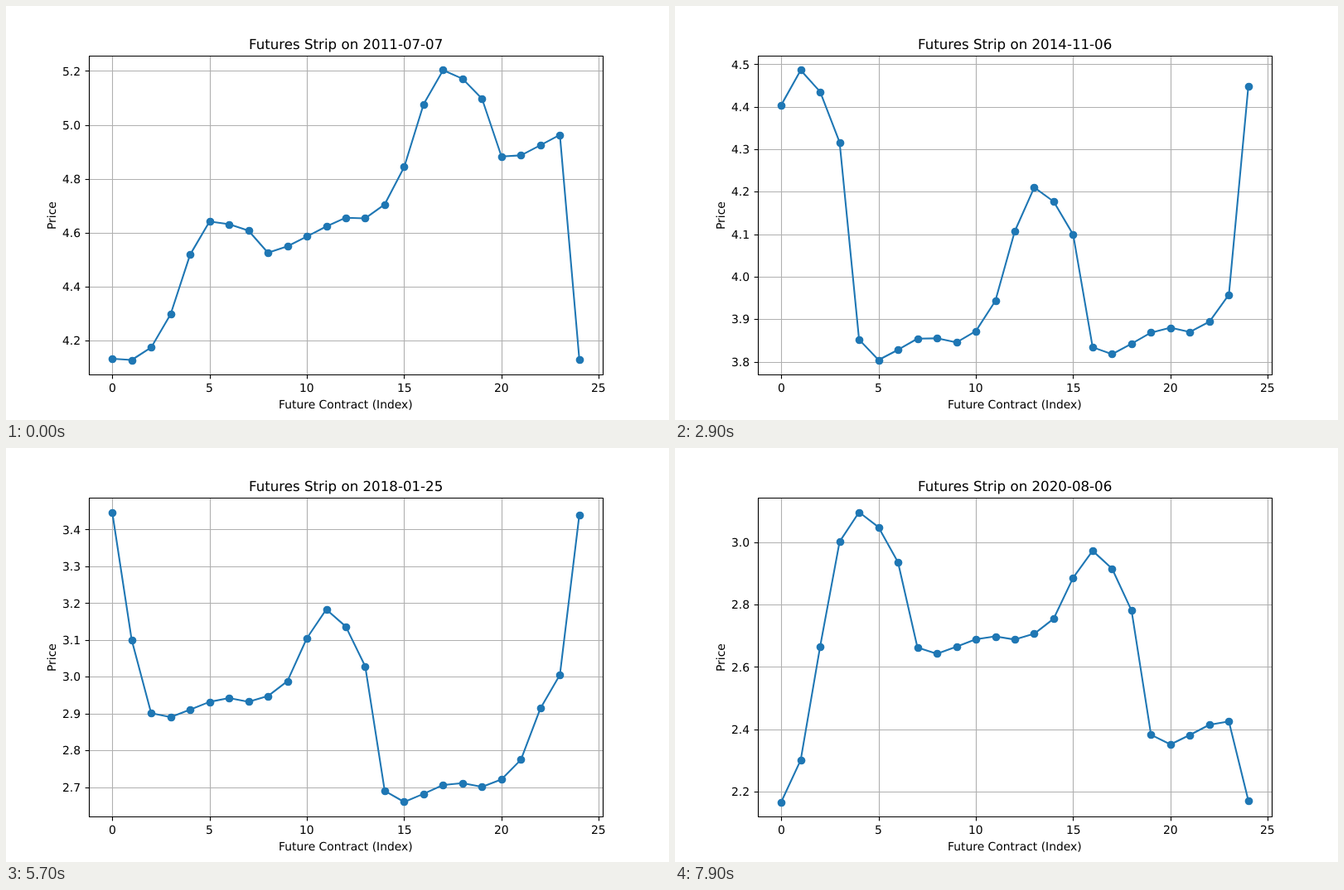
Animation of 800x500 px, one loop 8000 ms. Source, as an HTML page with a canvas:

```html
<!DOCTYPE html>
<html lang="en">
<head>
<meta charset="utf-8">
<title>Futures Strip</title>
<style>
  html, body { margin: 0; width: 100%; height: 100%; overflow: hidden; background: #fff; }
  canvas { display: block; width: 800px; height: 500px; }
</style>
</head>
<body>
<canvas id="chart" width="800" height="500"></canvas>
<script>
const ctx = document.getElementById("chart").getContext("2d");
const LOOP = 8000, STEP = 100, DAY = 864e5;
const FIRST_DATE = Date.UTC(2011, 6, 7);
const BOX = { left: 100, right: 720, top: 60, bottom: 445 };
const LAST = 24;
const BLUE = "#1f77b4", GRID = "#b0b0b0";
const PT = 100 / 72, THIN = 0.8 * PT, TICK = 3.5 * PT;
const FAMILY = '"DejaVu Sans", Verdana, sans-serif';

const dateAt = n => new Date(FIRST_DATE + n * 42 * DAY);
const lerp = (a, b, u) => a + (b - a) * u;
const snap = v => Math.floor(v + 0.5) + 0.5;

// Delivery month of the nearest contract: it expires two trading days before month end.
function frontMonth(n) {
  const date = dateAt(n), year = date.getUTCFullYear(), month = date.getUTCMonth();
  const end = new Date(Date.UTC(year, month + 1, 0));
  for (let left = 2; ;) {
    const weekday = end.getUTCDay();
    if (weekday % 6 && left-- === 0) break;
    end.setUTCDate(end.getUTCDate() - 1);
  }
  return year * 12 + month + (date > end ? 2 : 1);
}

// A year turns in January, March, April and August.
const TURNS = [0, 2, 3, 7];
const turnIndex = month =>
  Math.floor(month / 12) * 4 + TURNS.filter(t => t <= month % 12).length - 1;
const turnMonth = k => Math.floor(k / 4) * 12 + TURNS[k % 4];

// Autumn rise per month: a steeper year climbs earlier.
const RISE = [0, -0.07, -0.03, 0.07, 0.6], GAIN = [0, 0.12, 0.22, 0.5, 0.31];
const DIP = [0, 0.105, 0.055, 0];

// Prices at the turns, starting with the turn at or before the front month.
function strip(step, last, ...turns) {
  return { step, last, turns, month: frontMonth(step) };
}

const strips = [
  strip(0, 4.13, 4.133, 4.642, 4.608, 4.526, 4.656, 5.203, 5.097, 4.883, 4.99),
  strip(15, 4.01, 3.99, 4.13, 4.422, 4.336, 4.081, 4.156, 4.538, 4.443, 4.131),
  strip(29, 4.448, 4.23, 4.486, 4.316, 3.852, 3.855, 4.21, 4.099, 3.834, 3.88, 4.21),
  strip(46, 3.154, 2.72, 3.57, 3.538, 3.311, 3.328, 3.593, 3.465, 2.962, 2.941, 3.34),
  strip(57, 3.44, 3.596, 3.1, 2.901, 2.942, 3.183, 3.028, 2.69, 2.711, 3.005),
  strip(65, 3.68, 3.642, 3.354, 2.885, 2.9, 3.186, 2.921, 2.541, 2.57, 2.89),
  strip(79, 2.171, 2.12, 3.097, 2.936, 2.662, 2.698, 2.973, 2.781, 2.382, 2.425)
];

// Price of the same season in a known strip.
function seasonal({ month: front, turns }, month) {
  while (month < front) month += 12;
  while (month >= front + LAST) month -= 12;
  const k = turnIndex(month), j = k - turnIndex(front), s = month - turnMonth(k);
  const a = turns[j], b = turns[j + 1] ?? a, before = turns[j - 1] ?? a;
  switch (k % 4) {
    case 0: return lerp(a, b, s * 0.3);
    case 2: return lerp(a, b, s / 4) - DIP[s] * (before - a);
    case 3: return lerp(a, b, RISE[s] + GAIN[s] * (b - a));
    default: return a;
  }
}

const frontOf = s => seasonal(s, s.month);

// Turning points of the nearest price: step, price.
const fronts = [
  [7, 2.05], [18, 3.4], [24, 4.66], [31, 2.7], [41, 1.8], [58, 2.75], [64, 4], [66, 2.55], [78, 1.5],
  ...strips.map(s => [s.step, frontOf(s)])
].sort((a, b) => a[0] - b[0]);

function frontPrice(n) {
  const k = Math.max(1, fronts.findIndex(p => p[0] >= n));
  const [a, b] = [fronts[k - 1], fronts[k]];
  return lerp(a[1], b[1], (n - a[0]) / (b[0] - a[0]));
}

function pricesAt(n) {
  const k = Math.max(1, strips.findIndex(s => s.step >= n));
  const a = strips[k - 1], b = strips[k];
  const u = (n - a.step) / (b.step - a.step);
  const month = frontMonth(n);
  const values = Array.from({ length: LAST }, (_, i) =>
    lerp(seasonal(a, month + i), seasonal(b, month + i), u));
  // Near contracts follow the front price more than far ones.
  const shift = frontPrice(n) - values[0];
  const far = shift < 0 ? 0.4 : 0.1;
  const out = values.map((v, i) => v + shift * (far + (1 - far) * Math.exp(-i / 8)));
  out.push(out[0] + lerp(a.last - frontOf(a), b.last - frontOf(b), u));
  return out;
}

function tickStep(range) {
  const raw = range / 9, power = 10 ** Math.floor(Math.log10(raw));
  return power * [1, 2, 2.5, 5, 10].find(s => s * power >= raw - 1e-9);
}

function line(x1, y1, x2, y2, color) {
  ctx.strokeStyle = color;
  ctx.lineWidth = THIN;
  ctx.beginPath();
  ctx.moveTo(x1, y1);
  ctx.lineTo(x2, y2);
  ctx.stroke();
}

function text(str, x, y, align = 0.5, size = 10) {
  ctx.font = size * PT + "px " + FAMILY;
  ctx.textRendering = "geometricPrecision";
  ctx.fillStyle = "#000";
  ctx.fillText(str, Math.round(x - ctx.measureText(str).width * align), y);
}

function draw(n) {
  const prices = pricesAt(n);
  const min = Math.min(...prices), max = Math.max(...prices);
  const pad = (max - min) * 0.05, low = min - pad, high = max + pad;
  const { left, right, top, bottom } = BOX;
  const toX = i => left + (i + LAST * 0.05) / (LAST * 1.1) * (right - left);
  const toY = v => bottom - (v - low) / (high - low) * (bottom - top);

  ctx.fillStyle = "#fff";
  ctx.fillRect(0, 0, 800, 500);

  const step = tickStep(high - low);
  let digits = 0;
  while (digits < 3 && Math.abs(step * 10 ** digits - Math.round(step * 10 ** digits)) > 1e-6) digits++;
  const yTicks = [];
  for (let k = Math.ceil(low / step); k * step <= high; k++) yTicks.push(k * step);
  const xTicks = [0, 5, 10, 15, 20, 25];

  for (const i of xTicks) line(snap(toX(i)), top, snap(toX(i)), bottom, GRID);
  for (const v of yTicks) line(left, snap(toY(v)), right, snap(toY(v)), GRID);

  for (const i of xTicks) {
    const x = snap(toX(i));
    line(x, bottom + 0.5, x, bottom + 0.5 + TICK, "#000");
    text(String(i), toX(i), 466);
  }
  for (const v of yTicks) {
    const y = snap(toY(v));
    line(left + 0.5, y, left + 0.5 - TICK, y, "#000");
    text(v.toFixed(digits), left - 2 * TICK, Math.round(toY(v) + 5.2), 1);
  }

  ctx.strokeStyle = ctx.fillStyle = BLUE;
  ctx.lineWidth = 1.5 * PT;
  ctx.lineJoin = "round";
  ctx.beginPath();
  prices.forEach((v, i) => ctx.lineTo(toX(i), toY(v)));
  ctx.stroke();
  prices.forEach((v, i) => {
    ctx.beginPath();
    ctx.arc(snap(toX(i)), snap(toY(v)), 3.5 * PT, 0, 2 * Math.PI);
    ctx.fill();
  });

  ctx.strokeStyle = "#000";
  ctx.lineWidth = THIN;
  ctx.strokeRect(left + 0.5, top + 0.5, right - left, bottom - top);

  text("Futures Strip on " + dateAt(n).toISOString().slice(0, 10), 410, 52, 0.5, 12);
  text("Future Contract (Index)", 410, 486);

  // The axis label moves out when the tick labels get wider.
  ctx.save();
  ctx.translate(Math.round(59.9 - (digits - 1) * 8.84), 253);
  ctx.rotate(-Math.PI / 2);
  text("Price", 0, 0);
  ctx.restore();
}

const start = performance.now();
let shown = -1;
function tick() {
  const n = Math.floor((performance.now() - start) % LOOP / STEP);
  if (n !== shown) draw(shown = n);
  requestAnimationFrame(tick);
}
tick();
</script>
</body>
</html>
```
